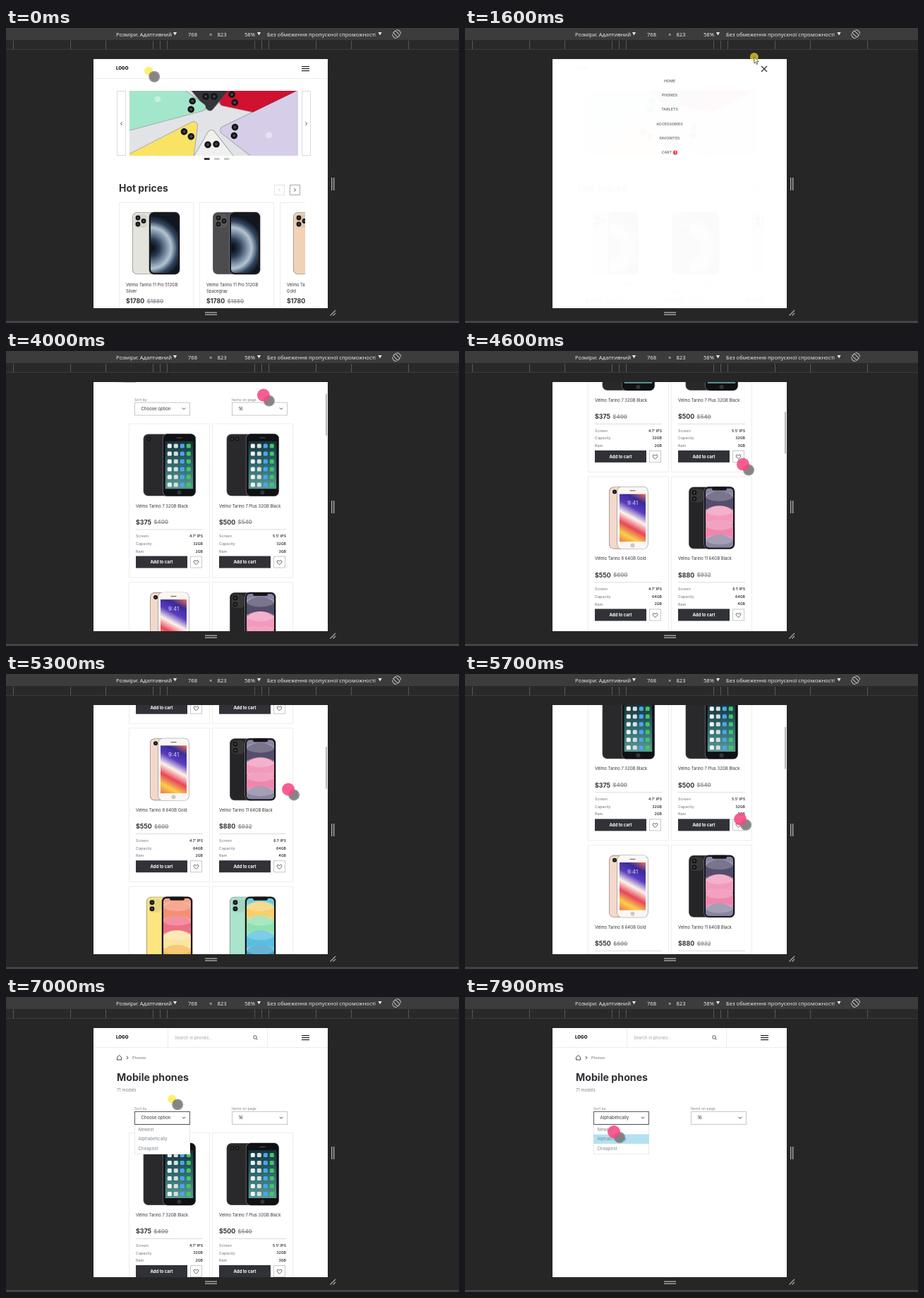
Recreate the animation shown at these times as an HTML page with a canvas. Size 642 by 418 pixels, loop 8000 ms.

```html
<!DOCTYPE html>
<html lang="uk">
<head>
<meta charset="utf-8">
<title>Shop preview</title>
<style>
html, body { margin: 0; width: 100%; height: 100%; overflow: hidden; background: #262627; }
canvas { display: block; }
</style>
</head>
<body>
<canvas id="stage" width="642" height="418"></canvas>
<script>
const ctx = document.getElementById('stage').getContext('2d');
const LOOP = 8000, GLIDE = 300;
const INK = '#313237', GREY = '#7f868d', LINE = '#ededef', EDGE = '#c4c8cb';
const PAGE = { x: 124, y: 44, w: 332, h: 353 };
const PAGE_HEIGHT = 2077;

// Cursor stops: time, x, y
const PATH = [
  [0, 202, 61], [1200, 416, 49], [1600, 410, 41], [2500, 284, 87], [2900, 303, 66],
  [3700, 358, 152], [4050, 366, 48], [4450, 392, 230], [4750, 396, 92], [5080, 398, 104],
  [5400, 401, 190], [5560, 395, 100], [5760, 388, 250], [6100, 377, 196],
  [6850, 230, 163], [7200, 242, 120], [7500, 211, 191], [LOOP, 211, 191]
];
const DRAGS = [[3700, 4050], [4450, 4750], [5080, 5400], [5560, 5760]];
const CLICKS = [[1140, 1260], [2440, 2560], [6790, 6910], [7650, LOOP]];

const BIG = { w: 74, back: '#29292c', rim: '#101114', home: true, wall: 'apps' };
const DUO = { w: 65, lens: 2, rim: '#151517', price: '$880', old: '$932', specs: ["6.1' IPS", '64GB', '4GB'] };
const PRODUCTS = [
  { ...BIG, name: 'Velmo Tarino 7 32GB Black', price: '$375', old: '$400', specs: ["4.7' IPS", '32GB', '2GB'], lens: 1 },
  { ...BIG, name: 'Velmo Tarino 7 Plus 32GB Black', price: '$500', old: '$540', specs: ["5.5' IPS", '32GB', '3GB'], lens: 2 },
  { name: 'Velmo Tarino 8 64GB Gold', price: '$550', old: '$600', specs: ["4.7' IPS", '64GB', '2GB'],
    w: 55, back: '#f3d9cb', rim: '#fbf6f3', lens: 1, home: true, wall: 'flame' },
  { ...DUO, name: 'Velmo Tarino 11 64GB Black', back: '#252527', wall: ['#8a83a3', '#554d6c', '#f29abd', '#ef86ae', '#8a84a0'] },
  { ...DUO, name: 'Velmo Tarino 11 64GB Yellow', back: '#fbe680', wall: ['#f6a58a', '#f58f74', '#ee6f86', '#fbe3a0', '#f5b84e'] },
  { ...DUO, name: 'Velmo Tarino 11 64GB Green', back: '#a9e4cd', wall: ['#6fcfd6', '#f6cf6e', '#8fe0b0', '#58bfe0', '#3f9fc8'] }
];
const HOT = [
  { color: 'Silver', back: '#e4e4df' }, { color: 'Spacegray', back: '#4c4c4e' }, { color: 'Gold', back: '#f2d2b6' }
].map(p => ({ ...p, w: 67, rim: '#18191c', lens: 3, wall: 'orbit' }));

// Banner handsets: colour, corner near the centre, direction, half angle
const FAN = [
  ['#343538', 289, 112, -90, 40], ['#a2e6cb', 278, 112, -170, 25], ['#cf1230', 308, 105, -20, 32],
  ['#f0f0ee', 291, 150, 86, 34], ['#f9e264', 266, 138, 125, 28], ['#d6cde9', 309, 145, 6, 32]
];

const clamp = v => Math.max(0, Math.min(1, v));
const smooth = v => v * v * (3 - 2 * v);

function cursorAt(t) {
  const i = PATH.findIndex(stop => stop[0] > t);
  const [t0, x0, y0] = PATH[i - 1], [t1, x1, y1] = PATH[i], k = (t - t0) / (t1 - t0);
  return { x: x0 + (x1 - x0) * k, y: y0 + (y1 - y0) * k };
}

// Follows the finger during a drag, then glides until the next one.
function scrollAt(t) {
  let scroll = 0;
  DRAGS.forEach(([from, to], i) => {
    if (t < from) return;
    const end = Math.min(t, to), moved = cursorAt(from).y - cursorAt(end).y;
    const next = i + 1 < DRAGS.length ? DRAGS[i + 1][0] : LOOP;
    const free = Math.max(0, Math.min(t, next) - to);
    scroll += moved + moved / (to - from) * GLIDE * (1 - Math.exp(-free / GLIDE));
  });
  return Math.max(0, scroll);
}

function rect(x, y, w, h, color) {
  ctx.fillStyle = color;
  ctx.fillRect(x, y, w, h);
}
function frame(x, y, w, h, color) {
  ctx.strokeStyle = color;
  ctx.lineWidth = 1;
  ctx.strokeRect(x + .5, y + .5, w - 1, h - 1);
}
function round(x, y, w, h, r, color) {
  ctx.beginPath();
  ctx.roundRect(x, y, w, h, r);
  ctx.fillStyle = color;
  ctx.fill();
}
function oval(x, y, rx, ry, color) {
  ctx.beginPath();
  ctx.ellipse(x, y, rx, ry, 0, 0, 7);
  ctx.fillStyle = color;
  ctx.fill();
}
const disc = (x, y, r, color) => oval(x, y, r, r, color);
function line(points, color, width = 1) {
  ctx.beginPath();
  points.forEach(([x, y]) => ctx.lineTo(x, y));
  ctx.strokeStyle = color;
  ctx.lineWidth = width;
  ctx.stroke();
}
function text(str, x, y, size, color = INK, weight = 400, align = 'left', family = 'Inter') {
  ctx.font = `${weight} ${size}px ${family}, sans-serif`;
  ctx.textAlign = align;
  ctx.fillStyle = color;
  ctx.fillText(str, x, y + size * .36);
  return ctx.measureText(str).width;
}
// Turn is counted in quarter circles; 0 points right.
function chevron(x, y, turn, color = INK) {
  ctx.save();
  ctx.translate(x, y);
  ctx.rotate(turn * Math.PI / 2);
  line([[-1.1, -2.2], [1.1, 0], [-1.1, 2.2]], color, .9);
  ctx.restore();
}
function clipTo(x, y, w, h, r, drawInside) {
  ctx.save();
  ctx.beginPath();
  ctx.roundRect(x, y, w, h, r);
  ctx.clip();
  drawInside();
  ctx.restore();
}
function blend(gradient, colors) {
  colors.forEach((c, i) => gradient.addColorStop(i / (colors.length - 1), c));
  return gradient;
}

function lens(x, y, r) {
  disc(x, y, r, '#141416');
  disc(x, y, r * .42, '#41464f');
}

function wallpaper(kind, x, y, w, h) {
  if (kind === 'apps') {
    rect(x, y, w, h, blend(ctx.createLinearGradient(x, y, x, y + h), ['#16323a', '#2d6a70', '#5c9a93']));
    const tints = ['#f4f4f4', '#45c463', '#f6a437', '#4aa5ee', '#e85a58', '#d8dde0', '#f2d24a'];
    for (let i = 0; i < 24; i++) {
      const row = Math.floor(i / 4);
      round(x + 3.3 + (i % 4) * 9, y + 4 + row * 11, 6, 6, 1.5, tints[(i * 5 + row) % 7]);
    }
  } else if (kind === 'flame') {
    const colors = ['#f4734c', '#3b2a9a', '#5a3cc0', '#fff4ea', '#e8455a', '#f8d04b', '#f4734c'];
    rect(x, y, w, h, blend(ctx.createLinearGradient(x + w, y, x, y + h), colors));
    text('9:41', x + w / 2, y + 13, 8, '#fff', 300, 'center');
  } else if (kind === 'orbit') {
    const glow = ctx.createRadialGradient(x, y + h * .58, 4, x, y + h * .58, 46);
    rect(x, y, w, h, blend(glow, ['#0e131c', '#2a3a50', '#6d8299', '#b4c3d2', '#33475f', '#10151f']));
  } else {
    rect(x, y, w, h, kind[0]);
    for (let i = 1; i < kind.length; i++) {
      const cy = y + h * i / 4.1;
      oval(x + w / 2, cy, w * .58, 16, kind[i]);
      oval(x + w / 2, cy - 9, w * .5, 7, 'rgba(255,255,255,.22)');
    }
  }
}

function phone(p, x, y) {
  const h = 88, fw = p.w > 70 ? 46 : 43, fx = x + p.w - fw;
  round(x, y, 42, h, 7, '#777');
  round(x + .6, y + .6, 41, h - 1.2, 6.5, p.back);
  if (p.lens > 1 && !p.home) round(x + 3, y + 3, 18, 19, 5, 'rgba(140,140,140,.18)');
  for (let i = 0; i < p.lens; i++) {
    if (p.home) lens(x + 8 + i * 7, y + 7, 3);
    else lens(x + 8 + (i === 2) * 8, y + 8 + (i % 2) * 9 + (i === 2) * 4.5, 3.4);
  }
  round(fx - .6, y - .4, fw + 1.2, h + .8, 7, '#8b8b8d');
  round(fx, y, fw, h, 6.5, p.rim);
  const side = p.home ? 3 : 2, top = p.home ? 10 : 2;
  const screen = [fx + side, y + top, fw - side * 2, h - top * 2];
  clipTo(...screen, p.home ? 0 : 5, () => wallpaper(p.wall, ...screen));
  if (p.home) {
    disc(fx + fw / 2, y + h - 5, 3, 'rgba(120,115,115,.35)');
    rect(fx + fw / 2 - 4, y + 5, 8, 1, '#555');
  } else {
    round(fx + 11, y, fw - 22, 5, 2.5, p.rim);
  }
}

function heart(x, y) {
  ctx.beginPath();
  ctx.moveTo(x, y + 3);
  ctx.bezierCurveTo(x - 6, y - 1, x - 2.5, y - 5, x, y - 1.5);
  ctx.bezierCurveTo(x + 2.5, y - 5, x + 6, y - 1, x, y + 3);
  ctx.strokeStyle = INK;
  ctx.lineWidth = .8;
  ctx.stroke();
}
function prices(now, old, x, y) {
  const ox = x + text(now, x, y, 8.8, INK, 700) + 3.5;
  const w = text(old, ox, y, 7.7, '#92979d', 700);
  rect(ox, y, w, 1, '#92979d');
}

function header(search) {
  text('LOGO', 156, 57, 6.2, '#111', 800);
  for (let i = 0; i < 3; i++) rect(419, 54 + i * 3, 11, 1.2, '#222');
  rect(124, 71, 332, 1, LINE);
  if (!search) return;
  rect(229, 44, 1, 27, LINE);
  rect(370, 44, 1, 27, LINE);
  text('Search in phones...', 239, 57.5, 5.9, '#9da4a9');
  ctx.beginPath();
  ctx.arc(353, 57, 2.3, 0, 7);
  ctx.strokeStyle = INK;
  ctx.lineWidth = .8;
  ctx.stroke();
  line([[354.7, 58.7], [356.5, 60.5]], INK, .9);
}

function handset([color, x, y, direction, spread]) {
  const angle = deg => deg * Math.PI / 180;
  ctx.save();
  ctx.translate(x, y);
  ctx.rotate(angle(direction));
  const dx = 250 * Math.cos(angle(spread)), dy = 250 * Math.sin(angle(spread));
  ctx.lineJoin = 'round';
  [['rgba(60,60,70,.35)', 12], [color, 10]].forEach(([paint, width]) => {
    ctx.beginPath();
    ctx.moveTo(0, 0);
    ctx.lineTo(dx, -dy);
    ctx.lineTo(dx, dy);
    ctx.closePath();
    ctx.fillStyle = ctx.strokeStyle = paint;
    ctx.lineWidth = width;
    ctx.stroke();
    ctx.fill();
  });
  lens(15, -6, 4.8);
  lens(15, 6, 4.8);
  disc(64, 0, 4.5, 'rgba(255,255,255,.4)');
  ctx.restore();
}

function homePage() {
  header(false);
  [157, 419].forEach((x, i) => {
    frame(x, 89, 13, 92, '#d9dbde');
    chevron(x + 6.5, 135.5, i ? 0 : 2);
  });
  clipTo(175, 89, 239, 92, 0, () => {
    rect(175, 89, 239, 92, '#e2e3e6');
    FAN.forEach(handset);
  });
  for (let i = 0; i < 3; i++) rect(281 + i * 14, 184, 7.5, 3, i ? '#c6c9cc' : INK);
  text('Hot prices', 160, 226.5, 13.9, INK, 700);
  frame(380, 222, 15, 15, '#dfe1e4');
  chevron(387.5, 229.5, 2, '#c5c9cd');
  frame(402, 222, 15, 15, '#a5abb1');
  chevron(409.5, 229.5, 0);
  clipTo(160, 240, 264, 160, 0, () => HOT.forEach((p, i) => {
    const x = 160 + i * 114;
    frame(x, 247, 106, 219, LINE);
    phone(p, x + 19, 261);
    text('Velmo Tarino 11 Pro 512GB', x + 10, 364, 5.9);
    text(p.color, x + 10, 373, 5.9);
    prices('$1780', '$1880', x + 10, 387);
  }));
}

function select(label, value, x, active) {
  text(label, x, 158.5, 5.2, GREY);
  frame(x, 162, 79, 19, active ? '#55595f' : EDGE);
  text(value, x + 9.5, 171, 6.1);
  chevron(x + 70, 171, 1);
}

function card(p, i) {
  const x = 174 + (i % 2) * 118, y = 192 + Math.floor(i / 2) * 224.5;
  frame(x, y, 115, 219, LINE);
  phone(p, x + 57.5 - p.w / 2, y + 15);
  text(p.name, x + 10, y + 117, 5.8);
  prices(p.price, p.old, x + 10, y + 140);
  rect(x + 10, y + 150, 95, .8, '#d0d3d6');
  ['Screen', 'Capacity', 'Ram'].forEach((label, n) => {
    const ly = y + 160 + n * 10.6;
    text(label, x + 10, ly, 5.3, GREY, 500);
    text(p.specs[n], x + 105, ly, 5.2, INK, 600, 'right');
  });
  rect(x + 10, y + 188, 73, 17, INK);
  text('Add to cart', x + 46.5, y + 196.5, 5.9, '#fff', 700, 'center');
  frame(x + 87, y + 188, 17, 17, EDGE);
  heart(x + 95.5, y + 197);
}

function phonesPage(t) {
  const picked = t >= 7850, open = t >= 6900;
  header(true);
  line([[157.5, 85.5], [160.5, 82.5], [163.5, 85.5], [163.5, 89], [157.5, 89], [157.5, 85.5]], INK, .9);
  chevron(172, 86, 0);
  text('Phones', 179, 86, 5.4, GREY, 500);
  text('Mobile phones', 157, 114, 14.2, INK, 700);
  text('71 models', 157, 132, 5.9, GREY);
  if (!picked) PRODUCTS.forEach(card);
  select('Sort by', picked ? 'Alphabetically' : 'Choose option', 182, open);
  select('Items on page', '16', 320, false);
  if (!open) return;
  rect(182, 181, 79, 42, '#fff');
  frame(182, 181, 79, 42, '#e6e8ea');
  if (picked) rect(182, 194.5, 79, 13.5, '#b4e1f1');
  ['Newest', 'Alphabetically', 'Cheapest'].forEach((label, i) => text(label, 187.5, 187.5 + i * 13.5, 6.2, GREY));
}

function menu(alpha) {
  ctx.globalAlpha = alpha;
  rect(PAGE.x, PAGE.y, PAGE.w, PAGE.h, '#fff');
  ['HOME', 'PHONES', 'TABLETS', 'ACCESSORIES', 'FAVORITES', 'CART'].forEach((label, i) =>
    text(label, i === 5 ? 286 : 290, 75 + i * 20.2, 5.3, '#7d8288', 700, 'center'));
  disc(298, 176.5, 3.2, '#e5484d');
  text('1', 298, 176.5, 4.5, '#fff', 700, 'center');
  line([[420, 54], [428, 62]], '#333', 1.2);
  line([[428, 54], [420, 62]], '#333', 1.2);
  ctx.globalAlpha = 1;
}

function rotateIcon(x, y) {
  ctx.save();
  ctx.translate(x, y);
  ctx.rotate(Math.PI / 4);
  ctx.strokeStyle = '#c4c4c4';
  ctx.lineWidth = 1;
  ctx.strokeRect(-4.5, -2.2, 9, 4.4);
  for (const middle of [-Math.PI / 2, Math.PI / 2]) {
    ctx.beginPath();
    ctx.arc(0, 0, 6, middle - .8, middle + .8);
    ctx.stroke();
  }
  ctx.restore();
}

function toolbar() {
  rect(0, 0, 642, 418, '#262627');
  rect(0, 0, 642, 17, '#3c3c3c');
  rect(0, 17, 642, 13, '#29292a');
  rect(0, 30, 642, 1, '#3a3a3b');
  rect(0, 415, 642, 3, '#434344');
  for (const offset of [62, 72, 82, 149, 199, 280]) {
    rect(290 - offset, 18, 1, 12, '#58585a');
    rect(290 + offset, 18, 1, 12, '#58585a');
  }
  const label = (s, x) => text(s, x, 9, 7.6, '#f2f2f2', 400, 'left', '"Open Sans"');
  label('Розміри: Адаптивний', 156);
  label('768', 258);
  label('×', 288);
  label('823', 299.5);
  label('58%', 338);
  label('Без обмеження пропускної спроможності', 370);
  for (const x of [239.5, 358.5, 530]) {
    ctx.beginPath();
    ctx.moveTo(x - 2.6, 6);
    ctx.lineTo(x + 2.6, 6);
    ctx.lineTo(x, 10.5);
    ctx.fillStyle = '#e6e6e6';
    ctx.fill();
  }
  rotateIcon(553.5, 8.5);
  for (let i = 0; i < 2; i++) {
    rect(461 + i * 3, 212, 1.4, 18, '#a8a8a8');
    rect(282, 402.5 + i * 3, 17, 1.4, '#a8a8a8');
    line([[459.5 + i * 4, 407.5], [467, 400 + i * 4]], '#a8a8a8', 1.2);
  }
}

function arrow(x, y) {
  ctx.beginPath();
  [[0, 0], [0, 9], [2, 7.2], [3.6, 10.5], [5, 9.8], [3.5, 6.6], [6.3, 6.4]]
    .forEach(([a, b]) => ctx.lineTo(x + a, y + b));
  ctx.closePath();
  ctx.fillStyle = '#fff';
  ctx.fill();
  ctx.strokeStyle = '#222';
  ctx.lineWidth = .7;
  ctx.stroke();
}

function cursor(t) {
  const { x, y } = cursorAt(t);
  const pressed = [...DRAGS, ...CLICKS].some(([from, to]) => t >= from && t < to);
  if (!pressed) disc(x, y, 6, 'rgba(250,235,40,.68)');
  if (y > PAGE.y) {
    disc(x + 8, y + 8, 8, 'rgba(112,112,112,.72)');
    disc(x + 8, y + 8, 6.5, 'rgba(125,125,125,.7)');
  } else {
    arrow(x, y);
  }
  if (pressed) disc(x, y, 9, 'rgba(245,72,130,.88)');
}

function draw(t) {
  toolbar();
  clipTo(PAGE.x, PAGE.y, PAGE.w, PAGE.h, 0, () => {
    rect(PAGE.x, PAGE.y, PAGE.w, PAGE.h, '#fff');
    const scroll = scrollAt(t);
    ctx.save();
    ctx.translate(0, -scroll);
    if (t < 2600) homePage();
    else phonesPage(t);
    ctx.restore();
    const bar = Math.min(clamp((t - 3690) / 60), clamp((6500 - t) / 300));
    ctx.globalAlpha = bar;
    round(453, 45 + scroll * PAGE.h / PAGE_HEIGHT, 2, 60, 1, '#b5b5b5');
    ctx.globalAlpha = 1;
    menu(smooth(clamp((t - 1270) / 360)) * (1 - clamp((t - 2650) / 290)));
  });
  cursor(t);
}

const start = performance.now();
function tick() {
  draw((performance.now() - start) % LOOP);
  requestAnimationFrame(tick);
}
tick();
</script>
</body>
</html>
```
